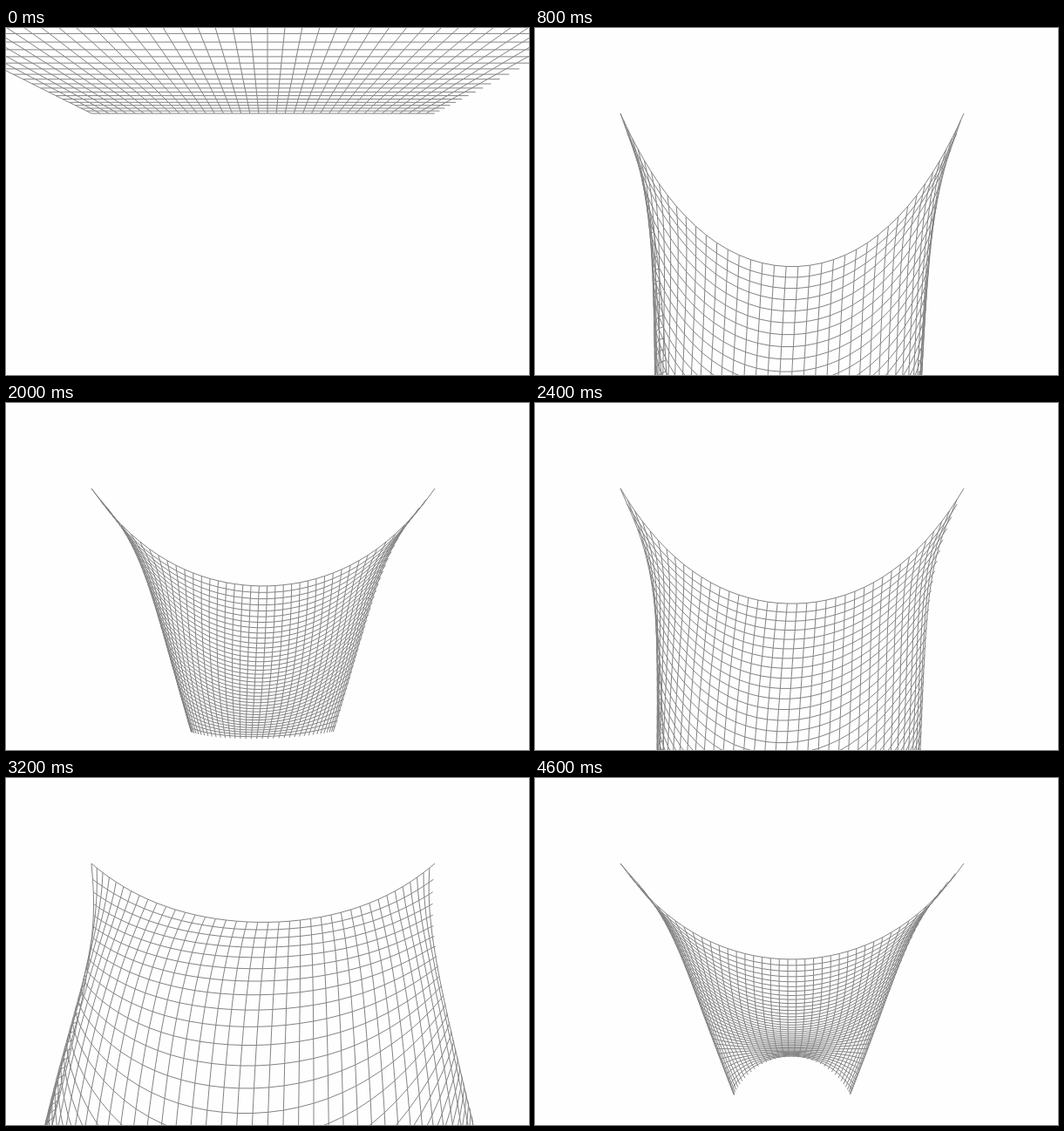
These frames come from a looping animation (600x398 px, 4700 ms). An HTML page:

```html
<!DOCTYPE html>
<html lang="en">
<head>
<meta charset="utf-8">
<title>Hanging net</title>
<style>
  html, body { margin: 0; width: 100%; height: 100%; overflow: hidden; background: #fefefe; }
  svg { display: block; width: 600px; height: 398px; }
</style>
</head>
<body>
<svg viewBox="0 0 600 398"><path id="net" fill="none" stroke="#838383" stroke-width="1"/></svg>
<script>
const LOOP = 4700, STEP = 100, DROP = 800;
const SWING = 3150, BOUNCE = 4000;     // periods of the two motions
const N = 40;                          // points per side
const CX = 300, CY = 199;              // vanishing point
const LEFT = 98, RIGHT = 492, TOP = 98; // pinned corners
const BACK = 0.99, ROW_DEPTH = 0.0277;

const wave = (time, period) => Math.cos(2 * Math.PI * time / period);
const settle = (row, rows) => 1 - Math.exp(-row / rows);

// swing runs from 1, towards the viewer, to -1, away.
function poseAt(time) {
  const swing = wave(time, SWING), reach = swing * swing;
  const sag = 153 - 70 * reach + 23 * wave(time - 700, BOUNCE);
  return {
    swing, sag,
    rowGap: .06 * sag + 1.8 + 1.8 * swing + .6 * reach,
    rowGrowth: .024 - .000004 * time + .077 * swing + .012 * reach,
    edgeDrop: .13 * sag + .5 + 6 * swing + 3 * reach,
    pinch: 42 - 10 * swing - 10 * reach,
    taper: .5 - 2.4 * swing - .6 * reach,
    bunch: (sag - 118) / 160 + .25 * swing + .28 * reach
  };
}

function rowOf(pose, j) {
  const { swing, sag, rowGap, rowGrowth } = pose;
  const inset = pose.pinch * settle(j, 5) + pose.taper * j;
  return {
    half: (RIGHT - LEFT) / 2 - inset,
    middle: (LEFT + RIGHT) / 2,
    lean: -.8 * j * (1 + swing),
    low: TOP + sag + rowGap * Math.expm1(rowGrowth * j) / rowGrowth,
    edge: TOP + pose.edgeDrop * j ** .85,
    bunch: pose.bunch + .6 * settle(j, 10)
  };
}

const spread = (t, bunch) => (1 + bunch) * t - bunch * t ** 3;
const catenary = x => (Math.cosh(1.8 * x) - 1) / (Math.cosh(1.8) - 1);

function pointOnRow(row, t) {
  const rise = catenary(spread(t, Math.min(row.bunch, .5)));
  return [
    row.middle + row.half * spread(t, row.bunch) + row.lean * (1 - t * t),
    row.low + (row.edge - row.low) * rise
  ];
}

// Blend the flat sheet overhead with the hanging one, in space.
function dropPoint([x, y], i, j, t, mix) {
  const v = j / (N - 1);
  const hung = BACK - .55 * (.4 * (1 - t * t) * (1 - v) + v);
  const blend = (a, b) => a + (b - a) * mix;
  const depth = blend(BACK - ROW_DEPTH * j, hung);
  if (depth < .06) return null;
  return [
    CX + blend(10 * i - 200, (x - CX) * hung) / depth,
    CY + blend(-100, (y - CY) * hung) / depth
  ];
}

function meshAt(time) {
  const pose = poseAt(Math.max(time, DROP));
  const mix = 1 - (1 - (time / DROP) ** 2) ** 3;
  return Array.from({ length: N }, (_, j) => {
    const row = rowOf(pose, j);
    return Array.from({ length: N }, (_, i) => {
      const t = 2 * i / (N - 1) - 1;
      const point = pointOnRow(row, t);
      return time < DROP ? dropPoint(point, i, j, t, mix) : point;
    });
  });
}

const net = document.getElementById("net");
const text = p => p[0].toFixed(1) + " " + p[1].toFixed(1);
const line = (a, b) => a && b ? "M" + text(a) + "L" + text(b) : "";

// The last column and row get no border, so loose ends remain.
function draw(time) {
  const mesh = meshAt(time);
  let d = "";
  for (let j = 0; j < N - 1; j++) {
    for (let i = 0; i < N - 1; i++) {
      d += line(mesh[j][i], mesh[j][i + 1]) + line(mesh[j][i], mesh[j + 1][i]);
    }
  }
  net.setAttribute("d", d);
}

const start = performance.now();
let shown = -1;
function tick() {
  const elapsed = Math.max(0, performance.now() - start) % LOOP;
  const time = Math.floor(elapsed / STEP) * STEP;
  if (time !== shown) draw(shown = time);
  requestAnimationFrame(tick);
}
tick();
</script>
</body>
</html>
```
